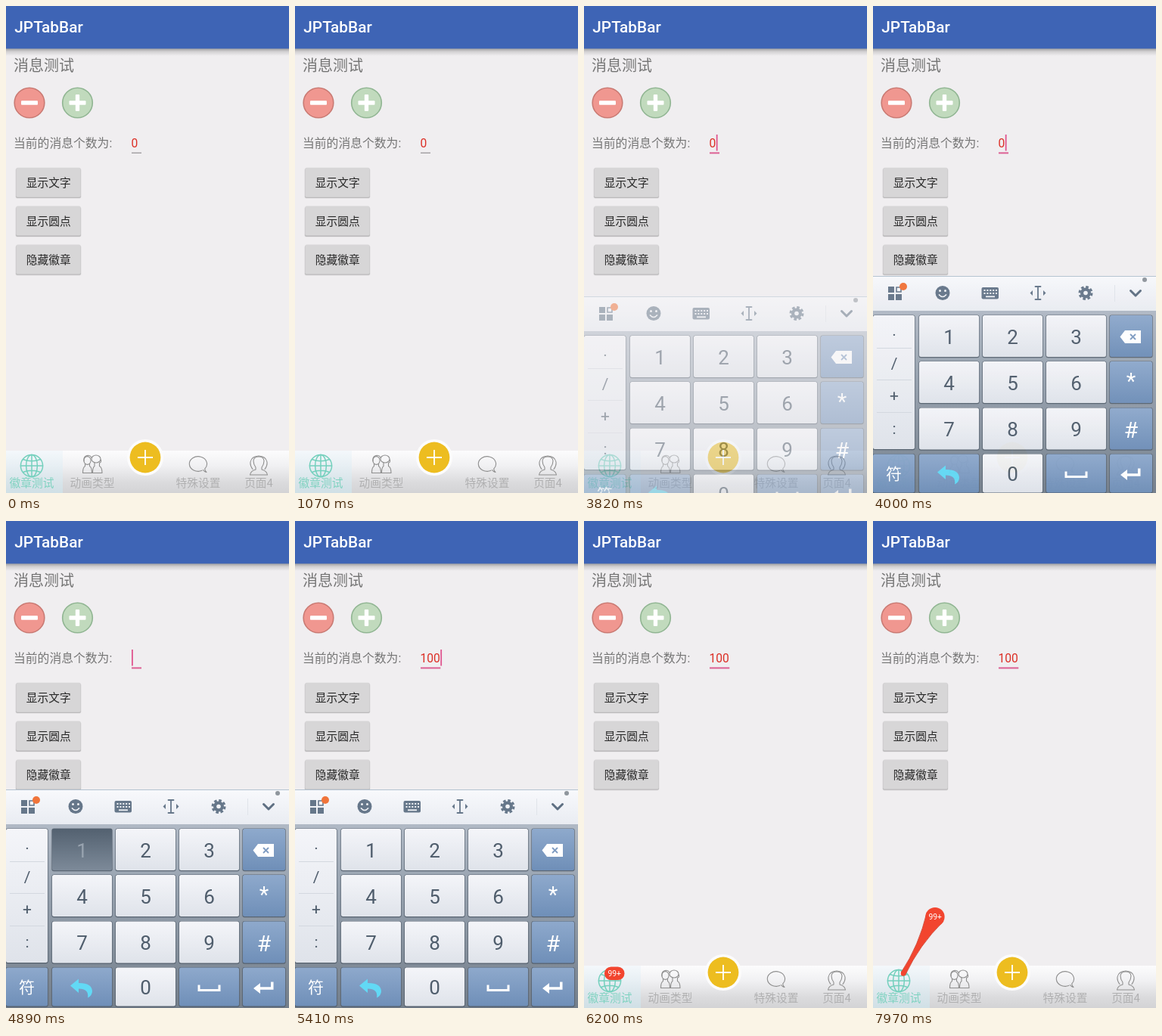
An HTML page for the animation above (8000 ms loop, 374 px wide and 644 px high).

```html
<!DOCTYPE html>
<html lang="zh">
<head>
<meta charset="utf-8">
<title>JPTabBar</title>
<style>
html, body { margin: 0; width: 100%; height: 100%; overflow: hidden; background: #f0eef0; }
svg { display: block; width: 374px; height: 644px; }
text { font-family: Roboto, "Noto Sans CJK SC", "Noto Sans CJK", sans-serif; white-space: pre; }
.mid { text-anchor: middle; }
.line { fill: none; stroke-linecap: round; stroke-linejoin: round; }
</style>
</head>
<body>
<svg viewBox="0 0 374 644" xmlns="http://www.w3.org/2000/svg">
  <defs>
    <linearGradient id="shade" x2="0" y2="1"><stop stop-color="#000" stop-opacity=".34"/><stop offset=".45" stop-color="#000" stop-opacity=".12"/><stop offset="1" stop-color="#000" stop-opacity="0"/></linearGradient>
    <linearGradient id="bar" x2="0" y2="1"><stop stop-color="#fcfcfd"/><stop offset=".35" stop-color="#f1f1f3"/><stop offset=".75" stop-color="#dbdbdd"/><stop offset="1" stop-color="#d3d3d5"/></linearGradient>
    <linearGradient id="picked" x2="0" y2="1"><stop stop-color="#eef5fa" stop-opacity=".6"/><stop offset="1" stop-color="#cfe3ea" stop-opacity=".8"/></linearGradient>
    <linearGradient id="tools" x2="0" y2="1"><stop stop-color="#f8f9fc"/><stop offset="1" stop-color="#e9ecf2"/></linearGradient>
    <linearGradient id="tray" x2="0" y2="1"><stop stop-color="#b0b9c5"/><stop offset=".3" stop-color="#98a3b0"/><stop offset="1" stop-color="#6d7884"/></linearGradient>
    <linearGradient id="light" x2="0" y2="1"><stop stop-color="#f4f5f9"/><stop offset="1" stop-color="#dfe3ea"/></linearGradient>
    <linearGradient id="blue" x2="0" y2="1"><stop stop-color="#8ea9cc"/><stop offset="1" stop-color="#6f8fb8"/></linearGradient>
    <linearGradient id="down" x2="0" y2="1"><stop stop-color="#536170"/><stop offset="1" stop-color="#7d8a99"/></linearGradient>
  </defs>

  <rect width="374" height="644" fill="#f0eef0"/>
  <rect y="56" width="374" height="10" fill="url(#shade)"/>
  <rect width="374" height="56.4" fill="#3e64b5"/>
  <text x="11.3" y="35.4" font-size="20.8" font-weight="500" fill="#fff">JPTabBar</text>
  <text x="10" y="86" font-size="20" fill="#757575">消息测试</text>

  <g stroke-width="1.6">
    <circle cx="31" cy="128" r="19.8" fill="#f09790" stroke="#c97a73"/>
    <circle cx="94.5" cy="128" r="19.8" fill="#c1dabd" stroke="#90b592"/>
  </g>
  <g fill="#fff">
    <rect x="20" y="125.3" width="22" height="5.4" rx="1"/>
    <rect x="83.5" y="125.3" width="22" height="5.4" rx="1"/>
    <rect x="91.8" y="117" width="5.4" height="22" rx="1"/>
  </g>

  <text x="10" y="187" font-size="15.8" fill="#757575">当前的消息个数为:</text>
  <text id="count" x="165.6" y="187" font-size="15.6" fill="#dc2f26"></text>
  <rect id="rule" x="166"/>
  <rect id="caret" y="170" width="1.8" height="21.5" fill="#e0558f"/>
  <g id="buttons"></g>

  <rect y="588" width="374" height="56" fill="url(#bar)"/>
  <rect y="588" width="75" height="56" fill="url(#picked)"/>
  <g id="labels"></g>
  <g class="line" stroke="#74d0bd" stroke-width="1.5">
    <circle cx="34" cy="608" r="14.6"/><ellipse cx="34" cy="608" rx="7.4" ry="14.6"/>
    <path d="M34 593.4V622.6M19.4 608H48.6M22.4 599.5Q34 604 45.6 599.5M22.4 616.5Q34 612 45.6 616.5"/>
  </g>
  <g class="line" stroke="#8f8f8f" stroke-width="1.1">
    <ellipse cx="107.5" cy="601" rx="4.6" ry="5.4"/><ellipse cx="119" cy="599" rx="6" ry="5"/>
    <path d="M113 597Q111 593.5 107 594.5Q102 596 103 602"/>
    <path d="M104.5 605.5V608.5Q101.5 610 101.5 617.5H113.5Q113.5 610 110.5 608.5V605.5"/>
    <path d="M117 604V608.5Q114.5 610 114.5 617.5H127Q127 610 123.5 608.5V604Q126 604 125.5 600"/>
    <path d="M260.5 613.5Q263 617 265 616.5Q262.5 614.5 262.8 611.8A11.6 9.8 0 1 0 259 614.3"/>
    <path d="M330 610Q327 606 327 601.5Q327.5 596 334 596Q340.5 596 341 601.5Q341 606 338 610V613Q345 615 345.5 620H322.5Q323 615 330 613V610"/>
    <path d="M326 612.5Q322.5 608 323 603Q324.5 595.5 334 595Q343.5 595.5 345 603Q345.5 608 342 612.5"/>
  </g>
  <circle cx="184" cy="597" r="24" fill="#fcfcfd"/>
  <circle cx="184" cy="597" r="20.4" fill="#edbd20"/>
  <path d="M174 597H194M184 587V607" stroke="#fff" stroke-width="1.8"/>

  <g id="badge" fill="#f2452f">
    <rect id="pill" x="27" y="589.5" width="26.5" height="17.5" rx="8.7"/>
    <path id="goo" stroke="#c93a28" stroke-width=".8"/>
    <circle id="root"/><circle id="drop" r="12.6"/>
    <text id="tip" class="mid" font-size="10.4" fill="#fff">99+</text>
  </g>

  <g id="board">
    <rect y="355" width="374" height="46" fill="url(#tools)"/>
    <path d="M0 355.5H374" stroke="#b4c3d1"/>
    <path d="M319.5 367V389" stroke="#e0e4ea"/>
    <circle cx="359" cy="360" r="3" fill="#8f969d"/>
    <g fill="#66778a">
      <path d="M20 369h8v8h-8zM20 379h8v8h-8zM30 379h8v8h-8z"/>
      <path d="M31 370h6v6h-6z" fill="none" stroke="#66778a" stroke-width="1.6"/>
      <circle cx="92" cy="377.5" r="9.5"/>
      <rect x="143.5" y="370" width="22.5" height="15.5" rx="2"/>
      <path d="M211 374L207.5 377.5L211 381zM225 374L228.5 377.5L225 381z"/>
      <circle cx="281" cy="377.5" r="7"/>
      <circle cx="281" cy="377.5" r="8" fill="none" stroke="#66778a" stroke-width="3" stroke-dasharray="3.6 2.683"/>
    </g>
    <circle cx="281" cy="377.5" r="2.8" fill="#f1f3f7"/>
    <circle cx="40" cy="369" r="5" fill="#f0743a"/>
    <g fill="#f1f3f7"><circle cx="88.5" cy="374.5" r="1.5"/><circle cx="95.5" cy="374.5" r="1.5"/></g>
    <path class="line" d="M87.5 380Q92 385 96.5 380" stroke="#f1f3f7" stroke-width="1.7"/>
    <path d="M146.5 374H164M146.5 378H164" stroke="#f1f3f7" stroke-width="2" stroke-dasharray="2 1.9"/>
    <path d="M149 382.3H161" stroke="#f1f3f7" stroke-width="1.8"/>
    <path class="line" d="M214.5 369H221.5M214.5 386H221.5M218 369V386" stroke="#66778a" stroke-width="1.8"/>
    <path class="line" d="M340.5 374.5L347 381L353.5 374.5" stroke="#5e6f82" stroke-width="3"/>
    <rect y="401" width="374" height="272" fill="url(#tray)"/>
    <g id="keys"></g>
    <path d="M5 450.5H51M5 492.5H51M5 535.5H51" stroke="#d3d8df"/>
    <text x="341" y="504.4" class="mid" font-size="29" fill="#fff">*</text>
    <path d="M326.5 435.5L333 427H354V444H333Z" fill="#fff"/>
    <path d="M340 432L347 439M347 432L340 439" stroke="#7f9cc2" stroke-width="1.8"/>
    <path d="M85 614.5L96 605.5V611Q113 610.5 114 621.5Q114 627.5 108 630.5Q110 618.5 96 618.5V624Z" fill="#62d9f5"/>
    <path d="M255 613.5V620.5H282V613.5" fill="none" stroke="#fff" stroke-width="3"/>
    <path d="M327 618L336 611V616.3H350V609.5H353.5V619.7H336V625Z" fill="#fff"/>
  </g>
</svg>
<script>
const LOOP = 8000, DIGIT = 8.76;
const $ = id => document.getElementById(id);

function add(parent, tag, attrs, label) {
  const el = document.createElementNS("http://www.w3.org/2000/svg", tag);
  set(el, attrs);
  if (label) el.textContent = label;
  parent.appendChild(el);
  return el;
}
function set(el, attrs) {
  for (const name in attrs) el.setAttribute(name, attrs[name]);
}
function show(el, on) {
  el.style.display = on ? "" : "none";
}

["显示文字", "显示圆点", "隐藏徽章"].forEach((label, i) => {
  const y = 214 + i * 50.9, g = $("buttons");
  add(g, "rect", { x: 12.5, y: y + 0.6, width: 87, height: 40, rx: 2.5, fill: "#000", opacity: 0.07 });
  add(g, "rect", { x: 13, y: y + 1, width: 86, height: 39, rx: 2, fill: "#000", opacity: 0.16 });
  add(g, "rect", { x: 13.3, y: y - 0.3, width: 85.4, height: 39, rx: 2, fill: "#d7d6d7" });
  add(g, "text", { x: 56.2, y: y + 25.4, class: "mid", "font-size": 14.7, "font-weight": 500, fill: "#262626" }, label);
});

[[34, "徽章测试"], [114, "动画类型"], [254, "特殊设置"], [334, "页面4"]].forEach(([x, label], i) =>
  add($("labels"), "text", { x, y: 635.5, class: "mid", "font-size": 14.7, fill: i ? "#b0b0b1" : "#7fd2c0" }, label));

const COLS = [[0, 55], [61, 79], [145, 79], [229, 79], [313, 56]];
const ROWS = [[407, 55], [468, 55], [529.5, 55], [590.5, 51]];
const keys = {};

function addKey(name, col, row, label, size = 26, tall = 0) {
  const [x, w] = COLS[col], [y, h] = ROWS[row], g = $("keys");
  const plain = tall || name === "0" || (row < 3 && col < 4);
  const fill = plain ? "url(#light)" : "url(#blue)";
  const ink = plain ? "#4f5d6c" : "#fff";
  add(g, "rect", { x: x - 0.7, y: y - 0.5, width: w + 1.4, height: (tall || h) + 1.8, rx: 3, fill: "#46525f", opacity: 0.75 });
  const face = add(g, "rect", { x, y, width: w, height: tall || h, rx: 2.5, fill });
  const text = add(g, "text", { x: x + w / 2, y: y + h / 2 + size * 0.39, class: "mid", "font-size": size, fill: ink }, label);
  keys[name] = down => {
    set(face, { fill: down ? "url(#down)" : fill });
    set(text, { fill: down ? "#98a3af" : ink });
  };
}

addKey("side", 0, 0, "", 20, 177);
["·", "/", "+", ":"].forEach((c, i) =>
  add($("keys"), "text", { x: 28, y: [440, 478, 520, 564][i], class: "mid", "font-size": 21, fill: "#4f5d6c" }, c));
for (let n = 1; n < 10; n++) addKey("" + n, 1 + (n - 1) % 3, Math.floor((n - 1) / 3), "" + n);
addKey("delete", 4, 0);
addKey("star", 4, 1);
addKey("hash", 4, 2, "#", 30);
addKey("symbols", 0, 3, "符", 21);
addKey("undo", 1, 3);
addKey("0", 2, 3, "0");
addKey("space", 3, 3);
addKey("enter", 4, 3);

// Each track is a list of [start, value...]; the latest started entry holds.
const at = (track, t) => track.reduce((now, step) => step[0] <= t ? step : now);
const inside = (spans, t) => spans.some(([a, b]) => t >= a && t < b);

const typed = [[0, "0"], [4710, ""], [4970, "1"], [5330, "10"], [5410, "100"]];
const pressed = [[0, ""], [4530, "delete"], [4710, ""], [4890, "1"], [4970, ""], [5150, "0"], [5410, ""]];
const slide = [[0, 58, 0], [3820, 29, 0.5], [3910, 10, 0.82], [4000, 2, 0.97], [4090, 0, 1],
  [6020, 1, 0.87], [6110, 15, 0.45], [6200, 58, 0]];
const caretOn = [[3730, 4180], [4710, 5850], [6290, 6810], [7350, 7880]];
const pull = [[0, 0], [7620, 0.08], [7710, 0.3], [7790, 0.56], [7880, 0.82], [7970, 1]];

function drawBadge(p) {
  const ox = 40, oy = 598.5, x = ox + 42 * p, y = oy - 75 * p;
  const dragging = p > 0;
  show($("pill"), !dragging);
  for (const id of ["goo", "root", "drop"]) show($(id), dragging);
  set($("tip"), { x: x + 0.2, y: y + 3.7 });
  if (!dragging) return;
  const r = 9 - 5.8 * p, big = 12.4, len = Math.hypot(x - ox, y - oy);
  const nx = (oy - y) / len, ny = (x - ox) / len;
  const mx = (ox + x) / 2, my = (oy + y) / 2;
  set($("root"), { cx: ox, cy: oy, r });
  set($("drop"), { cx: x, cy: y });
  set($("goo"), {
    d: `M${ox - nx * r} ${oy - ny * r}Q${mx} ${my} ${x - nx * big} ${y - ny * big}` +
       `L${x + nx * big} ${y + ny * big}Q${mx} ${my} ${ox + nx * r} ${oy + ny * r}Z`
  });
}

function draw(t) {
  const value = at(typed, t)[1], width = value.length * DIGIT, focus = t >= 3730;
  $("count").textContent = value;
  set($("rule"), {
    y: focus ? 193.4 : 193.7, width: Math.max(13, width),
    height: focus ? 2 : 1.1, fill: focus ? "#dc6094" : "#8a898b"
  });
  set($("caret"), { x: 166 + width });
  show($("caret"), inside(caretOn, t));

  const held = at(pressed, t)[1];
  for (const name of ["delete", "0", "1"]) keys[name](name === held);

  const [, drop, alpha] = at(slide, t);
  set($("board"), { transform: `translate(0 ${drop})`, opacity: alpha });

  show($("badge"), t >= 4970);
  drawBadge(at(pull, t)[1]);
}

const start = performance.now();
function tick() {
  draw((performance.now() - start) % LOOP);
  requestAnimationFrame(tick);
}
tick();
</script>
</body>
</html>
```
